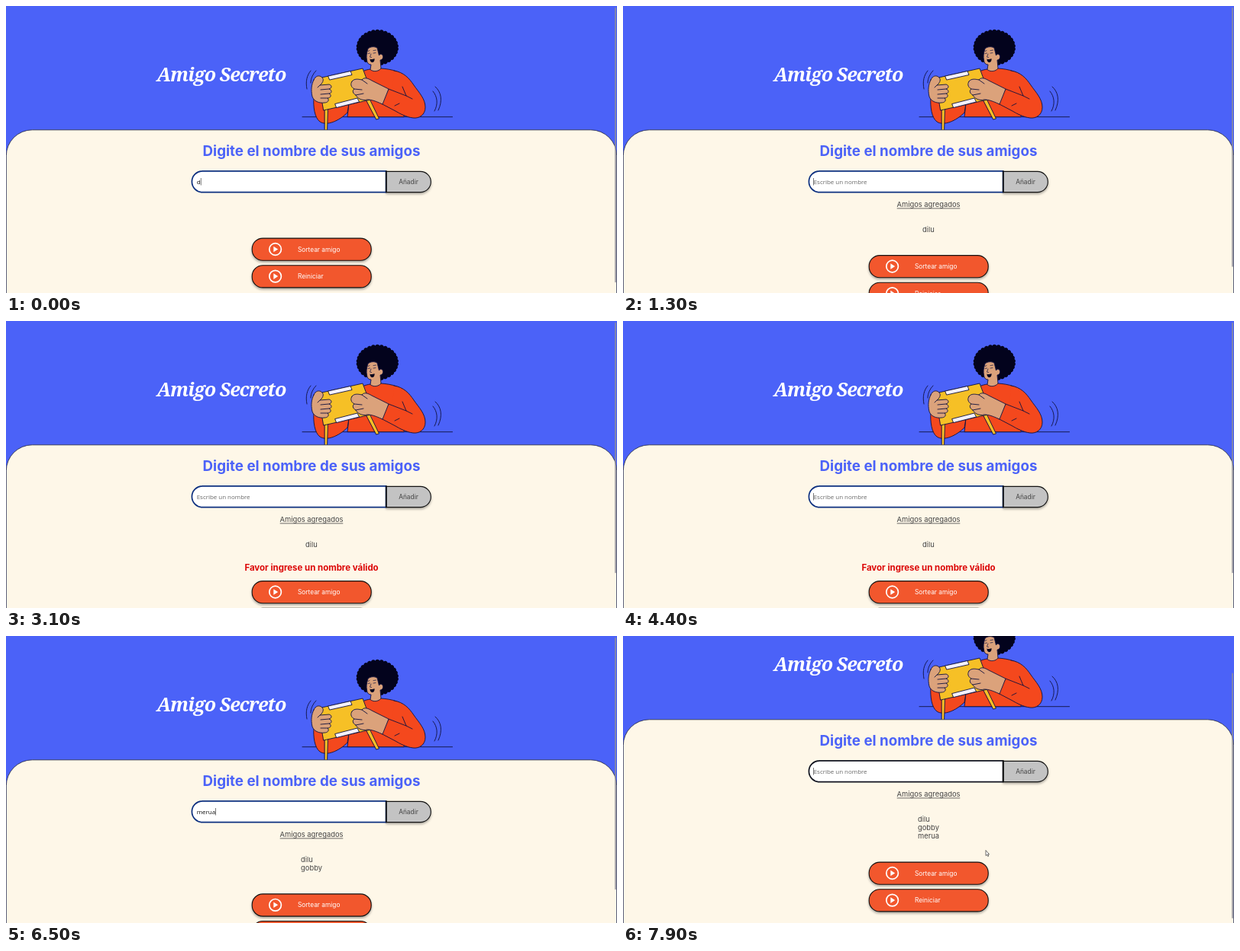
Animation, 800 px wide and 377 px high, one loop 8000 ms. Source, as an HTML page:

```html
<!DOCTYPE html>
<html lang="es">
<head>
<meta charset="utf-8">
<title>Amigo Secreto</title>
<style>
  html, body { margin: 0; width: 100%; height: 100%; overflow: hidden; background: #4b62f8; }
  svg { display: block; width: 800px; height: 377px; }
  text { font-family: Inter, sans-serif; fill: #444; }
  .title { font: italic 700 25px "Noto Serif", serif; letter-spacing: -1px; fill: #fff; }
  .heading { font-size: 18.75px; font-weight: 700; fill: #4b62f8; }
  .mid { text-anchor: middle; }
  .body { font-size: 9.375px; }
  .small { font-size: 8.33px; }
  .field { font-family: "Open Sans", sans-serif; font-size: 7.95px; }
  .error { font-size: 11.46px; font-weight: 700; fill: #dc0808; }
  .shadow { filter: drop-shadow(0 2px 1.5px rgba(0, 0, 0, .32)); }
  .art { stroke: #11123f; stroke-width: .9; stroke-linejoin: round; stroke-linecap: round; }
  .skin { fill: #dba27b; }
  .cloth { fill: #f4481d; }
  .gold { fill: #f6c026; }
  .pale { fill: #f4f1fb; }
  .line { fill: none; }
</style>
</head>
<body>
<svg viewBox="0 0 800 377">
  <defs>
    <g id="action">
      <rect class="shadow" x="322.2" y=".6" width="156" height="29.2" rx="14" fill="#f2572d" stroke="#111" stroke-width="1.1"/>
      <circle cx="352.6" cy="15" r="7.8" fill="none" stroke="#fff" stroke-width="1.7"/>
      <path d="M350.3 11.2V18.8L356.2 15Z" fill="#fff"/>
    </g>
  </defs>
  <rect width="800" height="377" fill="#4b62f8"/>
  <g id="page">
    <text class="title mid" x="281.8" y="99">Amigo Secreto</text>

    <g class="art">
      <path class="line" d="M388 145.700H584.500"/>
      <!-- torso -->
      <path class="cloth" d="M477 83C470 84 465 86 463 90L449 128L447 145.700H521L526 97C519 86 505 83 491 82Z"/>
      <!-- head -->
      <path id="hair" fill="#03031d" stroke="none"/>
      <path class="skin" d="M474 56C472 62 471.500 67 472.500 71C473 75 475 77 478 77L477 83.500C481 87 488 86 491 82L490 71C493 71 494.500 67 493 64.500C491.500 62.500 489.500 63 488.500 65L486 55C482 53 478 53 474 56Z"/>
      <path fill="#03031d" stroke="none" d="M476.500 69.500C478.500 70.500 480.500 70 482.500 69C483 72.500 481 74.500 479 74C477.500 73.500 476.500 72 476.500 69.500Z"/>
      <path class="line" stroke-width=".7" d="M474 62.500L476.500 62M481 62L484 61.500M478 63L476.500 67L478.500 67.500M474 59.500L476 58.500M481 58.500L484.500 58"/>
      <!-- left sleeve -->
      <path class="cloth" d="M403 120C402 132 404 147 411 152C420 158 436 151 447 140L449 128L424 122Z"/>
      <!-- box and its ribbons -->
      <path class="gold" d="M417.500 134H421.500L420.500 166H417.500Z"/>
      <path class="gold" d="M472 124L476 122L488.500 148L485 149Z"/>
      <path class="gold" d="M409 95L467 82L482 122L416 137Z"/>
      <path class="pale" d="M422 92L451 85.500L453 90.500L424 97Z"/>
      <path class="pale" d="M431 128.500L460 121L462.500 126L433 133.500Z"/>
      <!-- right arm -->
      <path class="cloth" stroke="none" d="M508 85C521 87 528 95 534 104C541 114 549 122 549 133C549 143 541 148 533 147C524 146 515 141 510 138L491 128L501 109L506 110Z"/>
      <path class="line" d="M508 85C521 87 528 95 534 104C541 114 549 122 549 133C549 143 541 148 533 147C524 146 515 141 510 138L491 128L501 109L524 118M519 106L524 118L532 122M509 131L515 128"/>
      <!-- hands -->
      <path class="skin" d="M453 99C456 95 461 96 466 97C469 93 474 95 479 98L501 109L493 129C484 125 479 123 473 123C466 125 460 121 458 117C454 115 453 111 456 109C451 106 451 102 453 99Z"/>
      <path class="line" d="M456 109L466 110M458 117L468 115M466 97L473 102"/>
      <path class="skin" d="M403 97C405 92 410 90 414 94C417 97 414 102 411 104L423 103C427 104 427 108 423 109C427 110 427 115 423 115C427 117 425 121 421 121C424 124 421 127 417 127C410 128 403 125 401 119C399 110 400 103 403 97Z"/>
      <path class="line" d="M423 109L412 110M423 115L412 116M421 121L412 121M411 104L408 107"/>
      <!-- shake marks -->
      <path class="line" d="M394 109C392 99 394 91 399 85M399 101C399 95 402 89 406 85M562 106C570 113 572 124 566 137M559 112C565 119 566 129 561 138"/>
    </g>

    <rect x=".3" y="162.800" width="799.400" height="420" rx="34" fill="#fef7e8" stroke="#23263c" stroke-width=".8"/>
    <text class="heading mid" x="400" y="196.800">Digite el nombre de sus amigos</text>

    <path class="shadow" d="M498 217.400H542.700A13.600 13.600 0 0 1 542.700 244.600H498Z" fill="#c3c3c3" stroke="#111" stroke-width="1.100"/>
    <path id="input" d="M497.500 216.900H257.300A13.900 13.900 0 0 0 257.300 244.700H497.500Z" fill="#fff" stroke-width="1.700"/>
    <path d="M497.800 216.300V245.200" stroke="#111" stroke-width="1.600"/>
    <text class="small mid" x="527" y="234">Añadir</text>
    <text id="typed" class="field" x="249.700" y="234"></text>
    <rect id="caret" y="226" width=".6" height="9.500" fill="#222"/>

    <g id="friends">
      <text class="body mid" x="400" y="264.200">Amigos agregados</text>
      <path d="M358.700 265.900H441.300" stroke="#444" stroke-width=".8"/>
      <text class="body row" y="296.500"></text>
      <text class="body row" y="307.800"></text>
      <text class="body row" y="319.100"></text>
    </g>
    <text id="error" class="error mid" x="400" y="327.800">Favor ingrese un nombre válido</text>

    <g id="actions">
      <use href="#action"/>
      <text class="small" x="382" y="18" style="fill:#fff">Sortear amigo</text>
      <g transform="translate(0 35.600)">
        <use href="#action"/>
        <text class="small" x="382" y="18" style="fill:#fff">Reiniciar</text>
      </g>
    </g>
  </g>
  <rect id="thumb" x="797" width="2" rx="1" fill="#8d8e9a" fill-opacity=".75"/>
  <path id="pointer" d="M475 281.500V288.500L476.600 287.200L477.700 289.500L478.800 289L477.700 286.700H479.500Z" fill="#fff" stroke="#333" stroke-width=".7"/>
</svg>
<script>
const LOOP = 8000;
const SCROLL = { from: 7450, to: 7800, by: 53 };
const NAMES = ["dilu", "gobby", "merua"];

const $ = id => document.getElementById(id);
const rows = [...document.querySelectorAll(".row")];
const steps = [];

// Each step: time, typed text, number of listed names, error flag, top of the buttons
const add = (at, typed, count, error, top) => steps.push({ at, typed, count, error, top });
const type = (name, times, count, error, top) =>
  times.forEach((at, i) => add(at, name.slice(0, i + 1), count, error, top));

type(NAMES[0], [0, 200, 350, 500], 0, false, 304.5);
add(850, "", 1, false, 327);
add(2200, "", 1, true, 341);
type(NAMES[1], [4600, 4750, 4900, 5050, 5200], 1, true, 341);
add(5500, "", 2, false, 338.3);
type(NAMES[2], [5900, 6050, 6200, 6350, 6500], 2, false, 338.3);
add(6700, "", 3, false, 349.5);

function drawHair() {
  const bumps = 30;
  const at = i => {
    const a = i / bumps * 2 * Math.PI;
    return [486.3 + 26.8 * Math.cos(a), 54.5 + 22 * Math.sin(a)].map(n => n.toFixed(1)).join(" ");
  };
  let d = "M" + at(0);
  for (let i = 1; i <= bumps; i++) d += "A3 3 0 0 1 " + at(i);
  $("hair").setAttribute("d", d + "Z");
}

function show(el, on) {
  el.setAttribute("visibility", on ? "visible" : "hidden");
}

let current;
function apply(step) {
  if (step === current) return;
  current = step;
  const typed = $("typed");
  typed.textContent = step.typed || "Escribe un nombre";
  typed.style.fill = step.typed ? "#111" : "#666";
  $("caret").setAttribute("x", step.typed ? 250 + typed.getComputedTextLength() : 249);

  rows.forEach((row, i) => row.textContent = i < step.count ? NAMES[i] : "");
  const widest = Math.max(...rows.map(row => row.getComputedTextLength()));
  rows.forEach(row => row.setAttribute("x", 400 - widest / 2));

  $("friends").style.display = step.count ? "" : "none";
  show($("error"), step.error);
  $("actions").setAttribute("transform", `translate(0 ${step.top})`);
  const pageHeight = step.top + 80.5;
  $("thumb").setAttribute("height", 377 * 377 / pageHeight - 8);
}

function render(t) {
  const step = steps.findLast(s => s.at <= t);
  apply(step);
  show($("caret"), (t - step.at) % 1000 < 500);

  const p = Math.min(1, Math.max(0, (t - SCROLL.from) / (SCROLL.to - SCROLL.from)));
  const y = SCROLL.by * p * p * (3 - 2 * p);
  $("page").setAttribute("transform", `translate(0 ${-y})`);
  $("thumb").setAttribute("y", 2 + y * 0.877);
  $("input").setAttribute("stroke", p > 0 ? "#10131f" : "#0d3080");
  show($("pointer"), p > 0);
}

drawHair();
const start = performance.now();
function tick() {
  render((performance.now() - start) % LOOP);
  requestAnimationFrame(tick);
}
tick();
</script>
</body>
</html>
```
